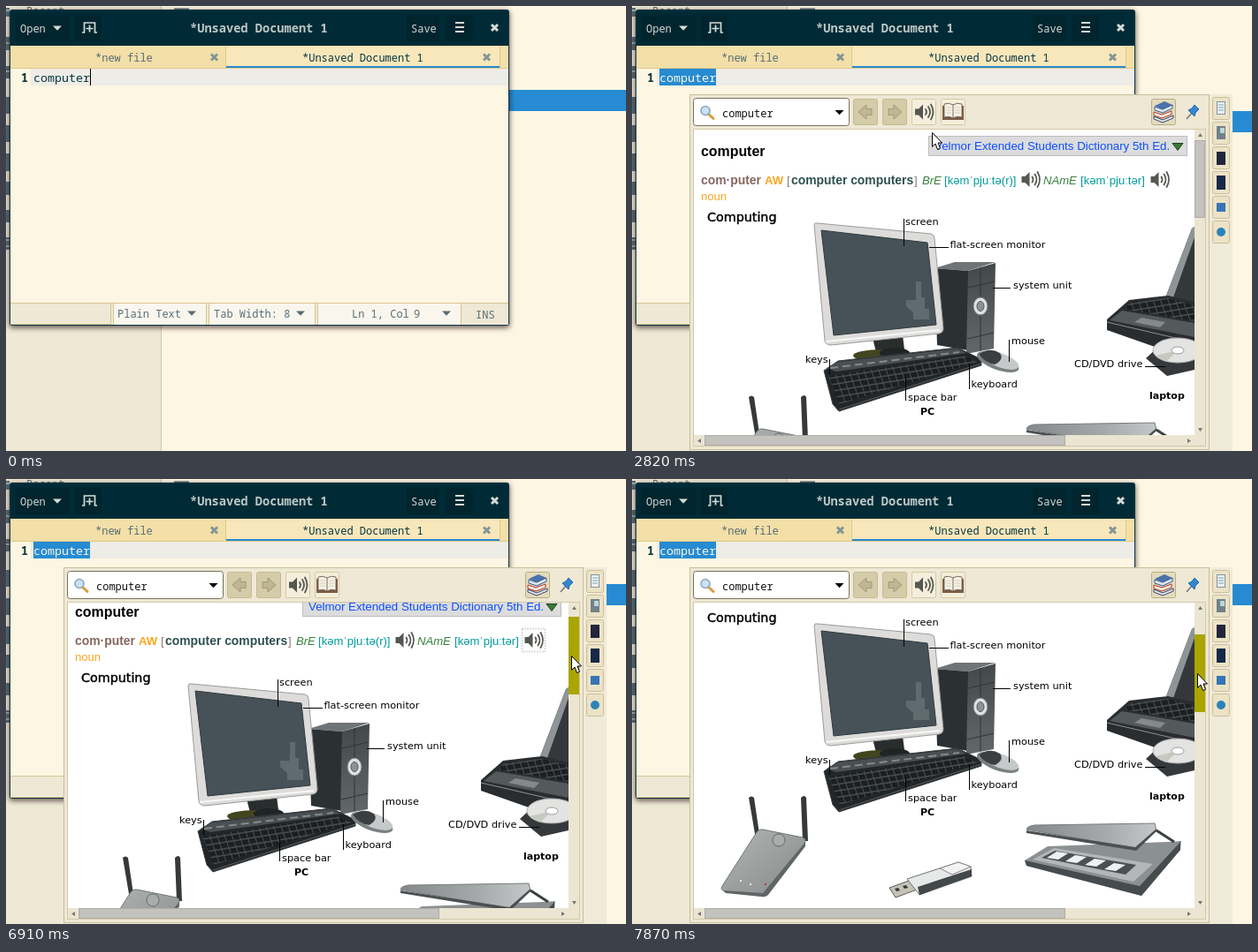
An HTML page for the animation above (8 s loop, 701 by 504 pixels).

```html
<!DOCTYPE html>
<html lang="en">
<head>
<meta charset="utf-8">
<title>Dictionary lookup</title>
<style>
/* Integer properties keep moving parts on whole pixels */
@property --x { syntax: "<integer>"; inherits: false; initial-value: 0 }
@property --y { syntax: "<integer>"; inherits: false; initial-value: 0 }
html, body { margin: 0; width: 100%; height: 100%; overflow: hidden; background: #fdf6e3 }
svg { display: block; width: 100vw; height: 100vh }
text { white-space: pre }
.mono { font: 12px "Noto Sans Mono", monospace; fill: #586e75 }
.code { font-size: 13.33px; fill: #073642 }
.sans { font: 13.1px "Liberation Sans", sans-serif }
.label { font: 11.3px "DejaVu Sans", sans-serif }
.bold { font-weight: bold }
.label .bold { font-size: 11px }
.btn { fill: #f4eedb; stroke: #d5c9a0 }
.off { fill: #d4cba8; stroke: #c6bb91 }

/* One loop is 8 s, so 1% is 80 ms */
.cut { animation: 8s step-end infinite }
.move { animation: 8s linear infinite; transform: translate(calc(var(--x) * 1px), calc(var(--y) * 1px)) }
.row { animation-name: row }
.typed { animation-name: typed }
.clicked { animation-name: clicked }
.popup { animation-name: popup }
.entry { animation-name: entry }
.pics { animation-name: pics }
.tip { animation-name: tip }
.hand { animation-name: hand }
.arrow { animation-name: arrow }
.focus1 { animation-name: focus1 }
.focus2 { animation-name: focus2 }
.hot { animation-name: hot }
.shown { animation-name: shown }
.scroll { animation-name: scroll }
.thumb { animation-name: thumb }
.mouse { animation-name: mouse }
@keyframes row { 0% { transform: none } 6.25%, 100% { transform: translateY(24px) } }
@keyframes typed { 0% { opacity: 1 } 9.125%, 100% { opacity: 0 } }
@keyframes clicked { 0% { opacity: 0 } 9.125% { opacity: 1 } 11.625%, 100% { opacity: 0 } }
@keyframes popup { 0% { opacity: 0 } 11.625%, 100% { opacity: 1 } }
@keyframes entry { 0% { opacity: 0 } 12.375%, 100% { opacity: 1 } }
@keyframes pics { 0% { opacity: 0 } 13.75%, 100% { opacity: 1 } }
@keyframes shown { 0% { opacity: 0 } 19.25%, 100% { opacity: 1 } }
@keyframes tip { 0% { opacity: 0 } 39.2% { opacity: 1 } 59.6% { opacity: 0 } 66.5% { opacity: 1 } 77.7%, 100% { opacity: 0 } }
@keyframes hand { 0% { opacity: 0 } 39% { opacity: 1 } 59.4% { opacity: 0 } 65.8% { opacity: 1 } 77.5%, 100% { opacity: 0 } }
@keyframes arrow { 0% { opacity: 1 } 39% { opacity: 0 } 59.4% { opacity: 1 } 65.8% { opacity: 0 } 77.5%, 100% { opacity: 1 } }
@keyframes focus1 { 0% { opacity: 0 } 49.25% { opacity: 1 } 71%, 100% { opacity: 0 } }
@keyframes focus2 { 0% { opacity: 0 } 71%, 100% { opacity: 1 } }
@keyframes hot { 0% { opacity: 0 } 80.5%, 100% { opacity: 1 } }
@keyframes scroll {
  0%, 83% { --y: 0; animation-timing-function: steps(10) }
  89.875% { --y: -34; animation-timing-function: steps(7) }
  93.5% { --y: -58; animation-timing-function: steps(7) }
  98.375%, 100% { --y: -82 }
}
@keyframes thumb {
  0%, 83% { --y: 0; animation-timing-function: steps(10) }
  89.875% { --y: 10; animation-timing-function: steps(7) }
  93.5% { --y: 17; animation-timing-function: steps(7) }
  98.375%, 100% { --y: 24 }
}
@keyframes mouse {
  0%, 19.25% { --x: 60; --y: 83 }
  23.25% { --x: 139; --y: 135; animation-timing-function: ease-out }
  28.875%, 29.375% { --x: 199; --y: 184 }
  32% { --x: 240; --y: 160 }
  34.5% { --x: 315; --y: 136 }
  37% { --x: 395; --y: 160 }
  39.25%, 42.375% { --x: 443; --y: 199 }
  46.125%, 57.5% { --x: 453; --y: 197; animation-timing-function: ease-in-out }
  67.5%, 75.25% { --x: 596; --y: 196; animation-timing-function: ease-in-out }
  81.25%, 83% { --x: 639; --y: 196; animation-timing-function: steps(10) }
  89.875% { --x: 639; --y: 206; animation-timing-function: steps(7) }
  93.5% { --x: 639; --y: 212; animation-timing-function: steps(7) }
  98.375%, 100% { --x: 639; --y: 220 }
}
</style>
</head>
<body>
<svg viewBox="0 0 701 504" preserveAspectRatio="none">
<defs>
  <filter id="shadow" x="-5%" y="-5%" width="110%" height="110%">
    <feDropShadow dx="0" dy="2" stdDeviation="3" flood-color="#201808" flood-opacity=".75"/>
  </filter>
  <clipPath id="view"><rect x="70" y="140" width="566" height="346"/></clipPath>
  <linearGradient id="lid" x2="1"><stop stop-color="#85898a"/><stop offset=".6" stop-color="#a5a9a9"/><stop offset="1" stop-color="#c5c8c8"/></linearGradient>
  <linearGradient id="front" y2="1" x2="0"><stop stop-color="#43484b"/><stop offset="1" stop-color="#62686a"/></linearGradient>
  <linearGradient id="shell" x2="1" y2="1"><stop stop-color="#b3b6b5"/><stop offset="1" stop-color="#858989"/></linearGradient>
  <pattern id="keys" width="8" height="7" patternUnits="userSpaceOnUse" patternTransform="matrix(1 -.16 .35 1 0 0)">
    <rect width="8" height="7" fill="#4b5053"/><rect width="7" height="5.600" fill="#1b1f22"/>
  </pattern>
  <path id="cross" d="M-3.5-3.5 3.5 3.5M3.5-3.5-3.5 3.5" stroke-width="3"/>
  <path id="down" d="M-5-2.500H5L0 2.800z"/>
  <g id="speaker" fill="none" stroke="#555753" stroke-width="1.800" stroke-linecap="round">
    <path d="M-10-3.5h4l5-5v17l-5-5h-4z" fill="#555753" stroke="none"/>
    <path d="M2-3q2 3 0 6M5-6q4 6 0 12M8-8.5q5 8.500 0 17"/>
  </g>
  <path id="back" d="M-8 0 1-8v4.500h6v7h-6v4.500z" fill="#c0b68f" stroke="#9f987c"/>
  <rect id="tab" x="656.500" width="19" height="25" rx="2" fill="#ece3c6" stroke="#cabf98"/>
  <rect id="focus" x="-13" y="-13" width="26" height="26" fill="none" stroke="#777" stroke-dasharray="1 2"/>
</defs>

<!-- Desktop behind the windows -->
<rect width="701" height="504" fill="#fdf6e3"/>
<rect width="175" height="504" fill="#eee8d5"/>
<path d="M175.500 0V504" stroke="#cfc7ae"/>
<text class="mono" x="23" y="10">Recent</text>
<path d="M190 3.500H207" stroke="#586e75" stroke-width="2"/>
<path d="M2 2V12M2 35V50M2 68V82M2 103V122M2 135V154M2 167V187M2 199V214M2 231V245M2 262V276" stroke="#586e75" stroke-width="4"/>
<path d="M0 5H4M0 42H4M0 74H4M0 265H4M0 272H4" stroke="#eee8d5"/>
<rect class="cut row" x="560" y="95" width="141" height="24" fill="#268bd2"/>

<!-- Text editor -->
<rect x="4" y="4" width="565" height="358" rx="3" fill="#073642" filter="url(#shadow)"/>
<rect x="5" y="5" width="563" height="40" rx="2" fill="#002b36"/>
<path d="M10 10h62v30H10zM78 10h30v30H78zM453 10h37v30h-37zM497 10h31v30h-31z" fill="#00252f"/>
<g fill="#d5dbd5" stroke="none">
  <text class="mono" x="16" y="30" style="fill:inherit">Open</text>
  <text class="mono" x="458" y="30" style="fill:inherit">Save</text>
  <text class="mono bold" x="208" y="30" style="fill:#bcc7c5;font-size:13.67px">*Unsaved Document 1</text>
  <use href="#down" x="58" y="25"/>
  <path d="M508 18h10v2h-10zM508 23h10v2h-10zM508 28h10v2h-10z"/>
</g>
<path d="M86 30H88.500V19H100.500V30H103M94.500 21.500V29.500M90.500 25.500H98.500" fill="none" stroke="#d5dbd5" stroke-width="1.700"/>
<use href="#cross" x="552.500" y="24.500" stroke="#d5dbd5"/>
<rect x="5" y="45" width="563" height="26" fill="#f3dfa8"/>
<rect x="249" y="46" width="309" height="23" fill="#f8e7bb"/>
<path d="M5 70.500H568M558.500 46V70M248.500 46V70" stroke="#dfc987"/>
<path d="M249 69H558" stroke="#268bd2" stroke-width="2"/>
<text class="mono" x="101" y="63">*new file</text>
<text class="mono" x="335" y="63" style="fill:#073642">*Unsaved Document 1</text>
<g stroke="#839496"><use href="#cross" x="235.500" y="58"/><use href="#cross" x="543.500" y="58"/></g>
<rect x="5" y="71" width="563" height="265" fill="#fdf6e3"/>
<rect x="28" y="71" width="540" height="19" fill="#eeece6"/>
<text class="mono code bold" x="17" y="86">1</text>
<text class="mono code" x="31" y="86">computer</text>
<path class="cut typed" d="M95.500 71V90" stroke="#000"/>
<path class="cut clicked" d="M64.500 71V90" stroke="#000"/>
<rect x="5" y="336" width="563" height="25" fill="#eee8d5"/>
<path d="M5 336.500H568M118.500 336V361M121.500 336V361M226.500 336V361M229.500 336V361M349.500 336V361M352.500 336V361M514.500 336V361M5 360.500H119" stroke="#d8c68f" fill="none"/>
<path d="M122 337h104v24H122zM230 337h119v24H230zM353 337h161v24H353z" fill="#f9f6ee"/>
<g class="mono">
  <text x="126" y="353">Plain Text</text>
  <text x="235" y="353">Tab Width: 8</text>
  <text x="391" y="353">Ln 1, Col</text>
  <text class="cut typed" x="461" y="353">9</text>
  <text class="cut clicked" x="461" y="353">5</text>
  <text x="531" y="354">INS</text>
  <use href="#down" x="210" y="348"/><use href="#down" x="333" y="348"/><use href="#down" x="498" y="348"/>
</g>

<!-- Dictionary popup -->
<g class="cut popup">
  <rect x="31" y="71" width="64" height="19" fill="#268bd2"/>
  <text class="mono code" x="31" y="86" style="fill:#fdf6e3">computer</text>
  <rect x="65" y="100" width="614" height="404" fill="#f0ead9"/>
  <rect x="65.500" y="100.500" width="587" height="402" fill="#eee8d5" stroke="#c9be9a"/>
  <rect x="69.500" y="104.500" width="176" height="31" rx="3" fill="#fff" stroke="#77715d"/>
  <path d="M86 122 92 127.500" stroke="#d99a3d" stroke-width="3" stroke-linecap="round"/>
  <circle cx="83" cy="118.500" r="5" fill="#c9e2f5" stroke="#8fa7b8" stroke-width="1.600"/>
  <text class="mono" x="102" y="126" style="fill:#111">computer</text>
  <use href="#down" x="234.500" y="120.500"/>
  <rect class="off" x="250.500" y="105.500" width="27" height="29" rx="2"/>
  <rect class="off" x="283.500" y="105.500" width="27" height="29" rx="2"/>
  <use href="#back" x="264" y="120"/>
  <use href="#back" transform="translate(297 120) scale(-1 1)"/>
  <rect class="btn" x="316.500" y="105.500" width="27" height="29" rx="2"/>
  <rect class="btn" x="349.500" y="105.500" width="27" height="29" rx="2"/>
  <use href="#speaker" x="330" y="120"/>
  <path d="M351 113v16h24v-16" fill="#7d5a48"/>
  <path d="M353 111q6-2 10 1 4-3 10-1v15q-6-2-10 1-4-3-10-1z" fill="#f6f1e5" stroke="#776a58"/>
  <path d="M363 112v15" stroke="#776a58"/>
  <path d="M355 115h6M355 118h6M355 121h6M365 115h6M365 118h6M365 121h6" stroke="#d5cec0"/>
  <rect x="587.500" y="105.500" width="27" height="29" rx="2" fill="#e4dbbd" stroke="#b9ad84"/>
  <path d="M591 113l11-5 9 4-11 5z" fill="#4c72ab"/><path d="M591 114l9 3 11-5v4l-11 5-9-3z" fill="#dfe3e6" stroke="#365c94"/>
  <path d="M590 120l9 3 11-4v4l-11 4-9-3z" fill="#f2e6d9" stroke="#b03a34"/>
  <path d="M590 125l10 4 12-5v3l-12 5-10-4z" fill="#ece8dc" stroke="#2f477a"/>
  <path d="M627 128l6-7" stroke="#777" stroke-width="1.500"/>
  <path d="M629 118l7 7 1-4 4-4-5-5-3 4z" fill="#3487cf" stroke="#2269a8"/>

  <use href="#tab" y="103.500"/><use href="#tab" y="131.500"/><use href="#tab" y="159.500"/>
  <use href="#tab" y="187.500"/><use href="#tab" y="215.500"/><use href="#tab" y="243.500"/>
  <rect x="661.500" y="108.500" width="9" height="14" fill="#eef2f4" stroke="#7e92a0"/>
  <path d="M663 112h6M663 115h6M663 118h6" stroke="#7aa0b8"/>
  <rect x="661" y="136" width="10" height="15" fill="#718188"/><rect x="665" y="138" width="5" height="6" fill="#bdd6d8"/>
  <rect x="661" y="165" width="10" height="15" fill="#22263c"/>
  <rect x="661" y="192" width="10" height="16" fill="#182848"/>
  <rect x="661" y="223" width="10" height="10" fill="#3675b5"/>
  <circle cx="666" cy="256" r="5" fill="#2b83b8"/>

  <rect x="69.500" y="139.500" width="579" height="359" fill="#fff" stroke="#d3c9a9"/>
  <g clip-path="url(#view)">
    <g class="move scroll">
      <g class="cut entry sans">
        <text class="bold" x="78" y="170" style="font-size:15.900px">computer</text>
        <rect x="335.500" y="147.500" width="292" height="22" fill="#dcdcdc" stroke="#bdbdbd"/>
        <text x="342" y="163" fill="#0b50ff" style="font-size:13.300px">Velmor Extended Students Dictionary 5th Ed.</text>
        <path d="M611 155.500h12l-6 8z" fill="#377a35" stroke="#1d451d"/>
        <text class="bold" x="78" y="202" fill="#84665f" style="font-size:13.900px">com·puter</text>
        <text class="bold" x="150" y="202" fill="#fba51d">AW</text>
        <text x="175" y="202" fill="#8b7873">[</text>
        <text class="bold" x="180" y="202" fill="#2f4f4f" style="font-size:13.900px">computer computers</text>
        <text x="319" y="202" fill="#8b7873">]</text>
        <g font-style="italic" fill="#39803f"><text x="328" y="202">BrE</text><text x="465" y="202">NAmE</text></g>
        <g fill="#009a9c"><text x="353" y="202">[kəmˈpjuːtə(r)]</text><text x="507" y="202">[kəmˈpjuːtər]</text></g>
        <text x="78" y="220" fill="#fba51d">noun</text>
        <use href="#speaker" x="450.500" y="196.500"/><use href="#speaker" x="596.500" y="196.500"/>
        <use class="cut focus1" href="#focus" x="450.500" y="196.500"/>
        <use class="cut focus2" href="#focus" x="596.500" y="196.500"/>
      </g>
      <g class="cut pics">
        <!-- Tower -->
        <path d="M342 297 365 290H411L380 300z" fill="#6f7476"/>
        <path d="M342 297 380 300V390L345 384z" fill="#2b3033"/>
        <path d="M380 300 411 291 409 388 378 394z" fill="url(#front)"/>
        <path d="M380 319 410 312M379 377 409 370M394 296V330M394 351V390" stroke="#303538" fill="none"/>
        <ellipse cx="394" cy="340" rx="8" ry="10" fill="#dfe1e1" stroke="#777c7e"/>
        <ellipse cx="394" cy="340" rx="4" ry="5.500" fill="#8d9294" stroke="#555a5c"/>
        <!-- Monitor -->
        <path d="M272 376 306 373 308 389 276 392z" fill="#292d2d"/>
        <ellipse cx="283" cy="396" rx="33" ry="7" fill="#43451f"/>
        <ellipse cx="297" cy="393" rx="17" ry="6" fill="#1f2425"/>
        <path d="M206 248q0-3 4-2L338 258q4 1 4 5L352 365q0 5-5 6L225 384q-6 0-7-5z" fill="#dddcda" stroke="#999b9b"/>
        <path d="M214 254 334 268 344 361 228 373z" fill="#465258" stroke="#303a3e"/>
        <path d="M310 340V333H321V312H327V330H331V343H336V355H318V347z" fill="#606b70"/>
        <path d="M219 380 348 367" stroke="#f7f7f6" stroke-width="2"/>
        <!-- Keyboard and mouse -->
        <path d="M217 413 233 402 368 387 395 400 395 407 234 459 227 451z" fill="#222629" stroke="#3a3f42"/>
        <path d="M220 410 233 403 368 388 378 393 231 414z" fill="#4a4f52"/>
        <path d="M222 419 374 396 391 403 235 451z" fill="url(#keys)"/>
        <path d="M224 410 370 392" stroke="#85898a" stroke-width="2" stroke-dasharray="9 5"/>
        <path d="M234 457 395 405" stroke="#5b6062"/>
        <g transform="rotate(20 414 402)">
          <ellipse cx="414" cy="403" rx="25" ry="9" fill="#7a7f81"/>
          <ellipse cx="416" cy="400.500" rx="22" ry="8" fill="#c6c9c9"/>
          <path d="M391 402q9-12 22-9 7 5-1 14-12 2-21-5z" fill="#3a3f42"/>
        </g>
        <!-- Laptop -->
        <path d="M604 328 633 252 636 250V340z" fill="#34383b"/>
        <path d="M604 328 633 252 636 250V262L612 330z" fill="#8f9497"/>
        <path d="M562 333 606 328 636 335V388L600 389 537 367V355z" fill="#2a2d30"/>
        <path d="M565 335 606 331 636 339V357L556 343z" fill="url(#keys)"/>
        <path d="M554 345 636 359V375L540 356z" fill="#54595c"/>
        <path d="M576 353 603 358 597 364 568 358z" fill="#85898b"/>
        <path d="M537 358 636 381" stroke="#8c9092"/>
        <path d="M581 399 605 377 636 381V412L605 419z" fill="#35393c"/>
        <ellipse cx="617" cy="390" rx="28" ry="14" fill="#e3e4e2" stroke="#aaa"/>
        <path d="M617 390 592 396 604 403z" fill="#c7c8bf"/>
        <ellipse cx="617" cy="390" rx="7" ry="4" fill="#fff" stroke="#999"/>
        <!-- Router -->
        <path d="M132 443q3-3 6 0L144 484H139zM191 443q4-4 6 0L199 492H193z" fill="#35393b"/>
        <path d="M148 479 193 488q5 2 2 7L154 551q-3 4-8 3L105 549q-6-2-3-6L141 482q3-4 7-3z" fill="url(#shell)" stroke="#707575"/>
        <path d="M103 548 148 551 196 493V498L154 553q-3 3-8 2L106 551z" fill="#606565"/>
        <circle cx="166" cy="491" r="7" fill="#a9adac" stroke="#656a6a"/>
        <path d="M133 541l2 0M122 537l2 0" stroke="#e8eaea" stroke-width="2"/>
        <path d="M150 541h2" stroke="#c0353b" stroke-width="2"/>
        <!-- Memory stick -->
        <path d="M291 545 313 537 322 547 298 556z" fill="#c5c2b5" stroke="#55595b"/>
        <path d="M297 546l4-1 2 3-4 1zM306 543l4-1 2 3-4 1z" fill="#33383a"/>
        <path d="M311 535 369 516 383 521 384 532 325 553z" fill="#e7e8e8" stroke="#6d7172"/>
        <path d="M325 553 384 532V524L323 544z" fill="#43484a"/>
        <path d="M348 523 369 516 383 521 362 530z" fill="#f3f3f3" stroke="#888"/>
        <!-- Scanner -->
        <path d="M444 514 470 498 608 493 621 492 620 502 576 554 446 520z" fill="#8b9092"/>
        <path d="M444 514 574 543 620 493 620 502 576 554 446 520z" fill="#464b4e"/>
        <path d="M453 513 477 500 589 518 567 538z" fill="#b3b7b8"/>
        <path d="M463 511 478 503 570 519 558 530z" fill="#4a5053"/>
        <path d="M469 511l11-7 13 2-11 7zM490 515l11-7 13 2-11 7zM512 519l11-7 13 2-11 7zM534 524l11-7 13 2-11 7z" fill="#edf1f1"/>
        <path d="M446 479q1-4 9-5L591 472 593 480 569 500z" fill="url(#lid)" stroke="#777b7c"/>
        <path d="M446 480 569 499 593 478V481L570 503 446 483z" fill="#4b5052"/>
        <path d="M593 480 613 493" stroke="#3b4042" stroke-width="3"/>

        <path d="M307.500 241V272M336 273.500H358M408 319.500H428M426.500 378V403M223.500 400V417M309.500 420V447M381.500 405V434M580 408.500H603" stroke="#000" fill="none"/>
        <g class="label">
          <text x="85" y="244" stroke="#000" stroke-width=".45" style="font-size:14.300px">Computing</text>
          <text x="309" y="248">screen</text>
          <text x="359.500" y="274">flat-screen monitor</text>
          <text x="431" y="320">system unit</text>
          <text x="429" y="383">mouse</text>
          <text x="196" y="404">keys</text>
          <text x="312" y="447">space bar</text>
          <text x="383.500" y="432">keyboard</text>
          <text x="500" y="409">CD/DVD drive</text>
          <text class="bold" x="326" y="463">PC</text>
          <text class="bold" x="585" y="445">laptop</text>
          <text class="bold" x="264" y="576">flash drive/stick</text>
          <text class="bold" x="487" y="576">scanner</text>
        </g>
      </g>
    </g>
  </g>

  <!-- Scrollbars -->
  <rect x="636" y="140" width="12" height="346" fill="#ebe5d2"/>
  <rect x="70" y="486" width="578" height="12" fill="#ebe5d2"/>
  <g class="move thumb">
    <rect x="636.500" y="152.500" width="11" height="87" fill="#c3c2bf" stroke="#afada7"/>
    <rect class="cut hot" x="636" y="152" width="12" height="88" fill="#aaa500"/>
  </g>
  <rect x="82.500" y="486.500" width="407" height="11" fill="#c3c2bf" stroke="#afada7"/>
  <path d="M640 148l2.500-4 2.500 4zM640 478l2.500 4 2.500-4zM78 490v5l-4-2.500zM628 490v5l4-2.500z" fill="#777"/>
  <g class="cut tip">
    <rect x="65.500" y="480.500" width="47" height="22" rx="2" fill="#eee8d5" stroke="#c5b98f"/>
    <text class="mono" x="71" y="497">Audio</text>
  </g>
</g>

<!-- Pointer -->
<g class="cut shown">
  <g class="move mouse" stroke="#000" fill="#fff">
    <path class="cut arrow" d="M.5.500V16.500L4 13 6.500 19.500 9.500 18.200 7 12H11.500z"/>
    <path class="cut hand" d="M-1.500 10V1.500q1.500-2 3 0V6q1.500-1 3 .5 1.500-1 3 .5 2-1 2.500 1V12L8.500 16H-.5L-4.500 10.500q0-2 3-.5zM1.500 6V9M4.500 6.500V9M7.500 7V9"/>
  </g>
</g>
</svg>
</body>
</html>
```
